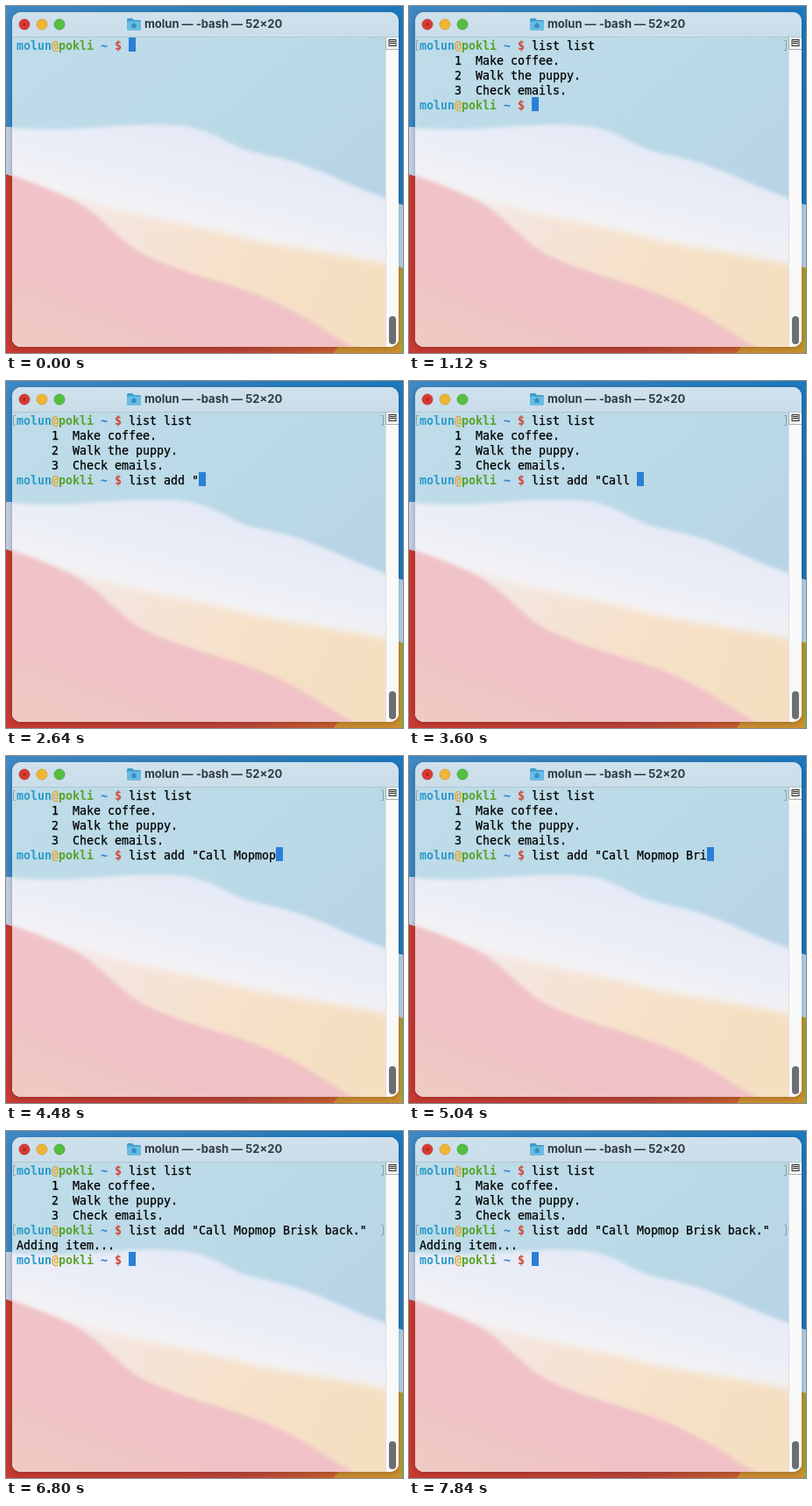
An HTML page for the animation above (8000 ms loop, 453 px wide and 396 px high).

```html
<!DOCTYPE html>
<html lang="en">
<head>
<meta charset="utf-8">
<title>Terminal to-do list</title>
<style>
  html, body { margin: 0; width: 100%; height: 100%; overflow: hidden; }
  svg { display: block; width: 453px; height: 396px; }
  .title { font: 700 13px Inter, sans-serif; fill: #303b43; }
  .row { font: 13.29px "DejaVu Sans Mono", monospace; fill: #000; stroke: #000; stroke-width: .25; white-space: pre; }
  .prompt { font-weight: 700; stroke: none; }
  .user { fill: #2b9bcb; }
  .at { fill: #e0a62e; }
  .host { fill: #58a32d; }
  .path { fill: #2f7fd0; }
  .sign { fill: #d0483a; }
  .mark { fill: none; stroke: #8ba0ab; }
</style>
</head>
<body>
<svg viewBox="0 0 453 396">
  <defs>
    <linearGradient id="deskBlue" x2="1" y2="0.3">
      <stop stop-color="#3f89c5"/><stop offset=".5" stop-color="#2f7fbc"/><stop offset="1" stop-color="#1a78bf"/>
    </linearGradient>
    <linearGradient id="deskRed" x2="1">
      <stop stop-color="#c83a32"/><stop offset=".7" stop-color="#bd4539"/><stop offset="1" stop-color="#c8602f"/>
    </linearGradient>
    <linearGradient id="bar" x2="0" y2="1">
      <stop stop-color="#cfe1ec"/><stop offset="1" stop-color="#c9dde9"/>
    </linearGradient>
    <linearGradient id="sky" x2="1" y2="1">
      <stop stop-color="#bfdce9"/><stop offset=".5" stop-color="#bad9e6"/><stop offset="1" stop-color="#b5cfe6"/>
    </linearGradient>
    <linearGradient id="foam" gradientUnits="userSpaceOnUse" x1="230" y1="140" x2="200" y2="255">
      <stop stop-color="#e4e9f6"/><stop offset=".55" stop-color="#ebeef7"/><stop offset="1" stop-color="#f5f4f5"/>
    </linearGradient>
    <linearGradient id="sand" gradientUnits="userSpaceOnUse" x1="60" y1="210" x2="410" y2="330">
      <stop stop-color="#f2eaeb"/><stop offset=".3" stop-color="#f5e3d8"/><stop offset=".6" stop-color="#f6e1c9"/><stop offset="1" stop-color="#f5dfc1"/>
    </linearGradient>
    <linearGradient id="rose" gradientUnits="userSpaceOnUse" x1="120" y1="230" x2="60" y2="392">
      <stop stop-color="#f0c3c8"/><stop offset=".6" stop-color="#f0c2c6"/><stop offset="1" stop-color="#efcac4"/>
    </linearGradient>
    <clipPath id="frame"><rect x="7" y="7" width="441" height="382" rx="10"/></clipPath>
    <filter id="soft" x="-10%" y="-10%" width="120%" height="120%"><feGaussianBlur stdDeviation="2"/></filter>
    <filter id="softer" x="-10%" y="-10%" width="120%" height="120%"><feGaussianBlur stdDeviation="4"/></filter>
    <filter id="shade" x="-5%" y="-5%" width="110%" height="110%"><feGaussianBlur stdDeviation="3"/></filter>
  </defs>

  <rect width="453" height="396" fill="url(#deskBlue)"/>
  <path d="M0 138H12V196H0Z" fill="#c6d0e6"/>
  <path d="M0 192L12 196V384H380V396H0Z" fill="url(#deskRed)"/>
  <path d="M444 224L453 227V300H444Z" fill="#b4d2e8"/>
  <path d="M444 296L453 299V396H374L382 384H444Z" fill="#cc8f30"/>
  <path d="M452 299V396" stroke="#86ad36" stroke-width="2"/>
  <rect x="6" y="8" width="443" height="383" rx="11" fill="#000" opacity=".2" filter="url(#shade)"/>

  <g clip-path="url(#frame)">
    <rect x="7" y="7" width="441" height="382" fill="url(#sky)"/>
    <path filter="url(#soft)" d="M-10 137C40 143 70 141 110 138S185 134 210 138C243 145 256 160 280 166C315 174 330 177 352 186C385 199 410 213 460 228V420H-10Z" fill="url(#foam)"/>
    <path filter="url(#softer)" d="M-10 190C50 206 85 222 135 234S225 252 265 263S370 280 460 300V420H-10Z" fill="url(#sand)"/>
    <path filter="url(#soft)" d="M-10 188C30 200 54 211 78 222C112 241 130 270 160 285C196 302 234 311 275 325C325 343 350 361 377 378L414 400V420H-10Z" fill="url(#rose)"/>
    <rect x="7" y="7" width="441" height="29" fill="url(#bar)"/>
    <path d="M7 35.5H448" stroke="#b3c6d1"/>
    <rect x="433" y="36" width="15" height="353" fill="#f9f9fa"/>
    <path d="M433.5 36V389" stroke="#dedfe2"/>
    <rect x="437" y="354" width="8" height="32" rx="4" fill="#6e6e70"/>
    <path d="M433.5 36V49.5H448" fill="none" stroke="#a9adb0"/>
    <rect x="437" y="38.5" width="8" height="7" fill="#e8e8e8" stroke="#2c2c2c"/>
    <path d="M438 40.5H444M438 42.5H444" stroke="#2c2c2c"/>
  </g>

  <g stroke-width=".7">
    <circle cx="21" cy="21" r="6" fill="#d93a33" stroke="#b52b27"/>
    <circle cx="21" cy="21" r="2" fill="#b32a25"/>
    <circle cx="41" cy="21" r="6" fill="#f1b535" stroke="#cf9526"/>
    <circle cx="61" cy="21" r="6" fill="#55bf42" stroke="#3d9d30"/>
  </g>
  <path d="M138 15.5Q138 14 139.5 14H144L146 16H152.500Q154 16 154 17.500V26Q154 27.500 152.500 27.500H139.500Q138 27.500 138 26Z" fill="#3f9ccb"/>
  <rect x="138" y="17.500" width="16" height="10" rx="1.500" fill="#67bce4"/>
  <path d="M146 19L142.500 22H143.500V25H148.500V22H149.500Z" fill="#388fbd"/>
  <text class="title" x="158" y="25">molun — -bash — 52×20</text>

  <g id="screen"></g>
  <rect id="cursor" width="8" height="16" fill="#2a80d6"/>
</svg>

<script>
const LOOP = 8000, LEFT = 12, TOP = 36, COL = 8, LINE = 17;
const PROMPT_COLS = 16;
const PROMPT = [["user", "molun"], ["at", "@"], ["host", "pokli"], ["path", " ~ "], ["sign", "$ "]]
  .map(([name, text]) => `<tspan class="prompt ${name}">${text}</tspan>`).join("");

// Each key run: start time, delay per key, typed text.
const COMMANDS = [
  {
    enter: 1110,
    runs: [[150, 80, "list list"]],
    output: ["     1  Make coffee.", "     2  Walk the puppy.", "     3  Check emails."]
  },
  {
    enter: 6550,
    runs: [[1590, 100, 'list add "'], [3030, 80, "Call "], [3990, 90, "Mopmop"],
           [4790, 80, " Brisk back"], [5910, 160, '."']],
    output: ["Adding item..."]
  }
];

const screen = document.getElementById("screen");
const cursor = document.getElementById("cursor");
let shown = "";

const typed = (runs, t) => runs.map(([start, delay, text]) =>
  text.slice(0, Math.max(0, Math.floor((t - start) / delay) + 1))).join("");

const rowText = (row, content) =>
  `<text class="row" x="${LEFT}" y="${TOP + row * LINE + 14}">${content}</text>`;

function brackets(row) {
  const y = TOP + row * LINE + 3.5;
  return `<path class="mark" d="M11 ${y}H8.5v11H11M428 ${y}h2.500v11H428"/>`;
}

function draw(t) {
  let row = 0, input = "", html = "";
  for (const { enter, runs, output } of COMMANDS) {
    input = typed(runs, t);
    html += rowText(row, PROMPT + input);
    if (t < enter) break;
    html += brackets(row++);
    for (const line of output) html += rowText(row++, line);
    input = "";
  }
  if (t >= COMMANDS[COMMANDS.length - 1].enter) html += rowText(row, PROMPT);
  if (html !== shown) screen.innerHTML = shown = html;
  cursor.setAttribute("x", LEFT + (PROMPT_COLS + input.length) * COL);
  cursor.setAttribute("y", TOP + row * LINE);
}

const begin = performance.now();
function tick() {
  draw((performance.now() - begin) % LOOP);
  requestAnimationFrame(tick);
}
tick();
</script>
</body>
</html>
```
